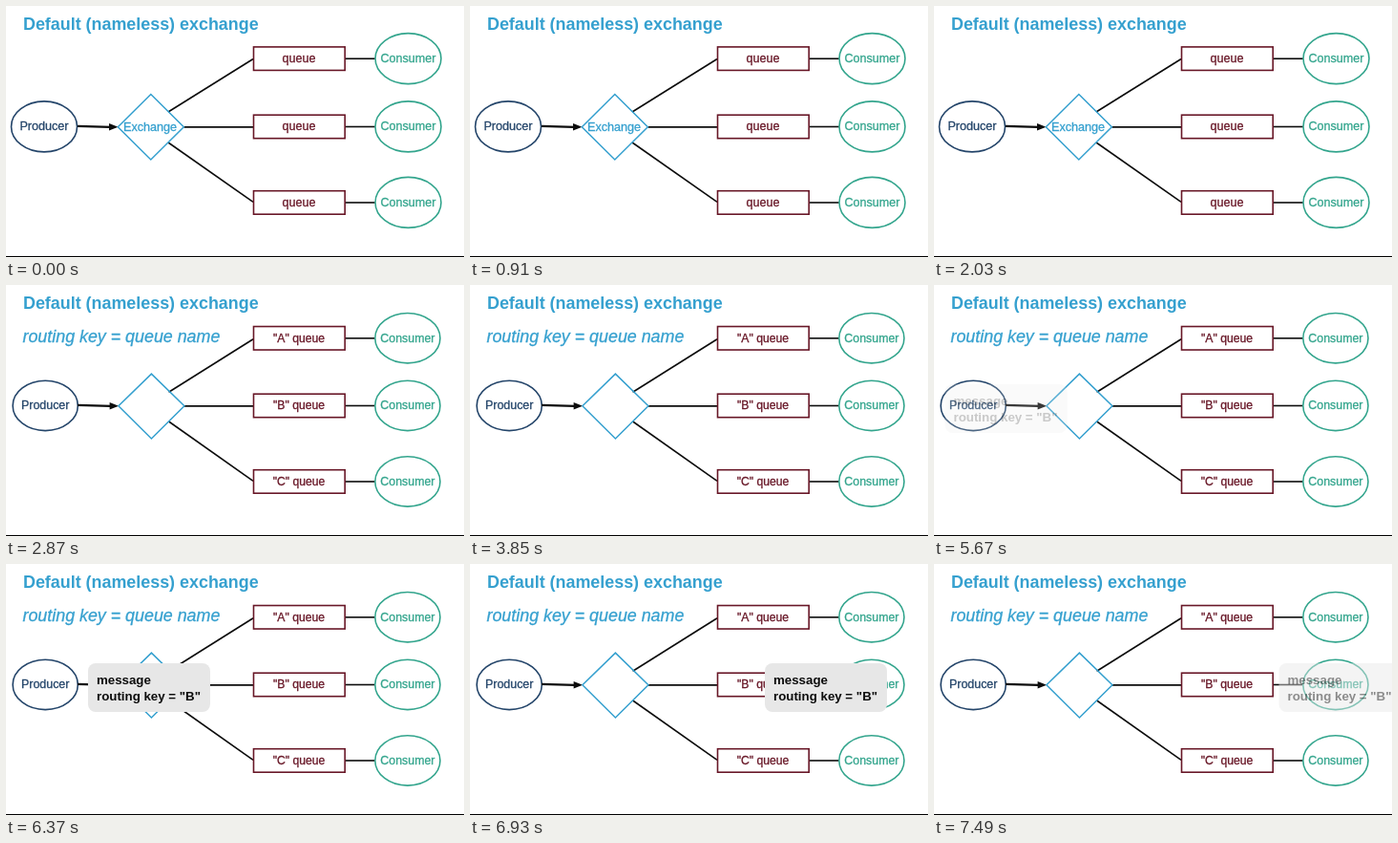
Animation, 480 px wide and 263 px high, one loop 7.56 s. Source, as an HTML page with a canvas:

```html
<!DOCTYPE html>
<html lang="en">
<head>
<meta charset="utf-8">
<title>Default exchange</title>
<style>
html, body { margin: 0; width: 100%; height: 100%; overflow: hidden; background: #fff; }
canvas { display: block; width: 480px; height: 263px; }
</style>
</head>
<body>
<canvas id="stage"></canvas>
<script>
const W = 480, H = 263, LOOP = 7560;
const FONT = '"Liberation Sans", Arial, sans-serif';
const BLUE = '#35a0cf', NAVY = '#24456a', WINE = '#681727', GREEN = '#33a58d', INK = '#0c0c0c';

const canvas = document.getElementById('stage');
const ctx = canvas.getContext('2d');
const dpr = window.devicePixelRatio || 1;
canvas.width = Math.round(W * dpr);
canvas.height = Math.round(H * dpr);

const clamp = v => Math.max(0, Math.min(1, v));
const progress = (t, from, to) => clamp((t - from) / (to - from));
const ease = u => (1 - Math.cos(Math.PI * u)) / 2;

function text(str, x, y, size, color, style = '', align = 'left') {
  ctx.font = `${style} ${size}px ${FONT}`;
  ctx.textAlign = align;
  ctx.fillStyle = color;
  ctx.fillText(str, x, y);
  // A hairline outline gives regular weights a little more body.
  if (style !== 'bold') {
    ctx.strokeStyle = color;
    ctx.lineWidth = 0.3;
    ctx.strokeText(str, x, y);
  }
}

function path(points, color, width, closed) {
  ctx.beginPath();
  points.forEach(([x, y]) => ctx.lineTo(x, y));
  if (closed) ctx.closePath();
  ctx.strokeStyle = color;
  ctx.lineWidth = width;
  ctx.stroke();
}

function node(label, x, y, rx, ry, size, color) {
  ctx.beginPath();
  ctx.ellipse(x, y, rx, ry, 0, 0, Math.PI * 2);
  ctx.strokeStyle = color;
  ctx.lineWidth = 1.6;
  ctx.stroke();
  text(label, x, y + 3.9, size, color, '', 'center');
}

function arrow(x1, y1, x2, y2) {
  path([[x1, y1], [x2 - 8, y2]], INK, 2.3);
  ctx.beginPath();
  ctx.moveTo(x2, y2);
  ctx.lineTo(x2 - 9.5, y2 - 3.7);
  ctx.lineTo(x2 - 9.5, y2 + 3.7);
  ctx.fillStyle = INK;
  ctx.fill();
}

function diagram(named) {
  const k = named ? 0.6 : 0;
  const size = named ? 12.4 : 12.6;
  const rx = named ? 34.1 : 34.5;
  const ry = named ? 26.2 : 26.5;
  const cx = 151.8 + k;

  ctx.fillStyle = '#fff';
  ctx.fillRect(0, 0, W, H);
  text('Default (nameless) exchange', 18, 25.3, 17.9, BLUE, 'bold');
  if (named) text('routing key = queue name', 17.5, 60.2, 17.85, BLUE, 'italic');

  path([[170 + k, 111 + 2 * k], [259, 55.5 + 2 * k]], INK, 1.6);
  path([[186.5, 126.9], [259, 126.9]], INK, 1.6);
  path([[170 + k, 143], [259, 205.4]], INK, 1.6);
  node('Producer', named ? 41.2 : 40, 126.4, rx, ry, size, NAVY);
  arrow(75, 125.8, 117.5 + k, 126.8);

  path([[cx, 92.5 + k], [cx + 34.5, 126.8], [cx, 161], [cx - 34.5, 126.8]], BLUE, 1.5, true);
  if (!named) text('Exchange', 151, 130.6, size, BLUE, '', 'center');

  [55 + k, 126.3, 205.8].forEach((y, i) => {
    path([[355, y + 0.2], [387, y + 0.2]], INK, 1.6);
    ctx.strokeStyle = WINE;
    ctx.lineWidth = 1.6;
    ctx.strokeRect(259.5, y - 12.1, 95.7, 24.5);
    const label = named ? `"${'ABC'[i]}" queue` : 'queue';
    text(label, 307, y + 3.9, named ? 12.2 : size, WINE, '', 'center');
    node('Consumer', 421.5 - k, y + 0.1, rx, ry, size, GREEN);
  });

  ctx.fillStyle = '#000';
  ctx.fillRect(0, H - 1, W, 1);
}

function message(x, alpha) {
  ctx.globalAlpha = alpha;
  ctx.beginPath();
  ctx.roundRect(x, 104, 128, 51, 8);
  ctx.fillStyle = '#e7e7e7';
  ctx.fill();
  text('message', x + 9, 126.2, 13.3, INK, 'bold');
  text('routing key = "B"', x + 9, 143.2, 13.3, INK, 'bold');
  ctx.globalAlpha = 1;
}

function draw(t) {
  ctx.setTransform(canvas.width / W, 0, 0, canvas.height / H, 0, 0);
  const blend = progress(t, 2080, 2600);
  if (blend < 1) diagram(false);
  if (blend > 0) {
    ctx.globalAlpha = blend;
    diagram(true);
    ctx.globalAlpha = 1;
  }

  const alpha = progress(t, 5600, 5950) * (1 - progress(t, 7250, 7690));
  if (alpha > 0) message(11.5 + 350 * ease(progress(t, 5984, 7252)), alpha);
}

const start = performance.now();
function tick() {
  draw((performance.now() - start) % LOOP);
  requestAnimationFrame(tick);
}
tick();
</script>
</body>
</html>
```
